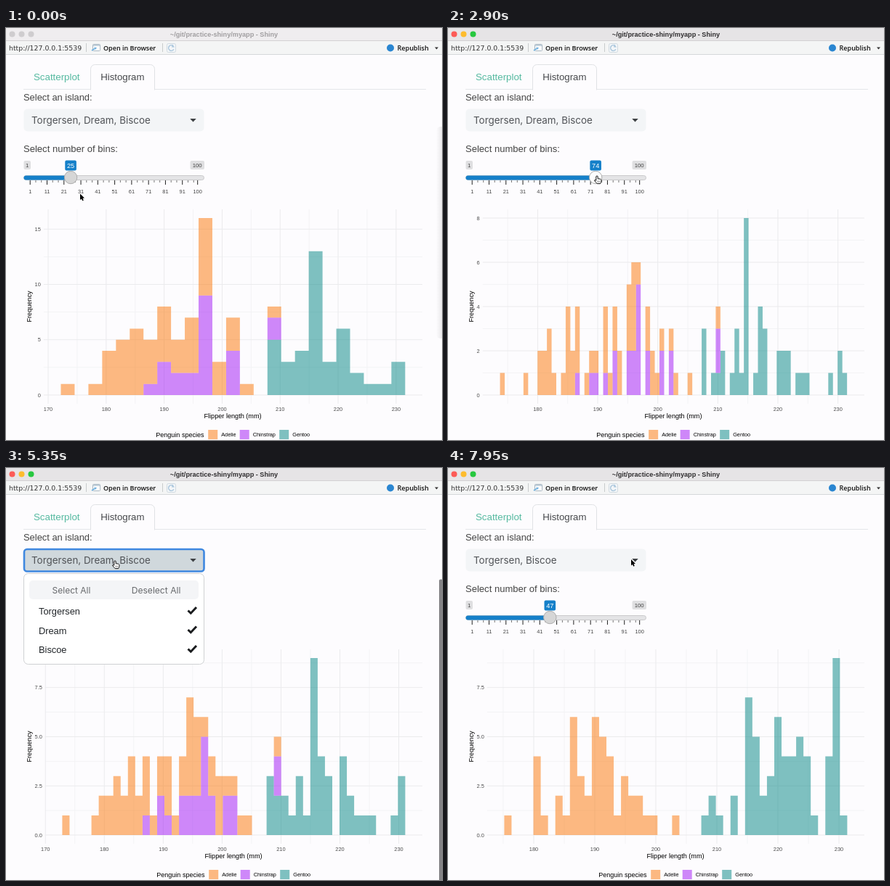
Write an HTML page with a canvas that moves like this. It is 600 by 568 pixels and loops after 8000 ms.

```html
<!DOCTYPE html>
<html lang="en">
<head>
<meta charset="utf-8">
<title>Histogram app</title>
<style>
  html, body { margin: 0; width: 100%; height: 100%; overflow: hidden; background: #fdfcfe; }
  canvas { display: block; width: 600px; height: 568px; }
</style>
</head>
<body>
<canvas id="stage" width="600" height="568"></canvas>
<script>
const ctx = document.getElementById('stage').getContext('2d');
const LOOP = 8000;
const SANS = '"Liberation Sans", Arial, sans-serif';
const ROUND = 'Inter, sans-serif';
const TOOL = '"Open Sans", sans-serif';
const BG = '#fdfcfe', BLUE = '#1580c9';

// Moments when something happens, in ms
const T = {
  activate: 450, grab: 600, release: 1500, plot74: 2300,
  regrab: 3050, rerelease: 4150, scrollbar: 4100, plot47: 4750,
  open: 5250, deselect: 6350, plotTwo: 6650, close: 7450, scrollbarGone: 7450
};

// Flipper length counts per mm, from a starting length; stacked bottom to top
const SPECIES = ['Adelie', 'Chinstrap', 'Gentoo'];
const COLORS = { Adelie: '#fb7706', Chinstrap: '#9f15f5', Gentoo: '#018583' };
const STACK = ['Gentoo', 'Chinstrap', 'Adelie'];
const threeIslands = {
  Adelie: [174, [1,0,0,0,1,0,2,2,3,1,1,4,2,3,1,1,1,3,1,2,2,3,4,1,2,2,1,1,1,1,0,1,0,0,0,0,1]],
  Chinstrap: [187, [1,0,1,1,1,0,2,0,2,2,5,2,0,0,2,2,0,0,0,0,0,0,0,2]],
  Gentoo: [208, [3,1,1,2,1,3,1,8,1,4,3,0,2,2,2,1,1,1,0,0,0,1,2,1]]
};
const twoIslands = {
  Adelie: [176, [1,0,0,0,2,2,1,0,2,1,6,0,3,2,6,5,4,0,1,3,2,2,1,0,1,0,0,1]],
  Chinstrap: [187, []],
  Gentoo: [208, [1,2,1,0,0,2,0,7,5,0,2,3,6,4,4,5,0,4,1,0,4,9,0,1]]
};

function makePlot(data, bins, left, step) {
  const min = data.Adelie[0], max = 231;
  const width = (max - min) / (bins - 1);
  const first = Math.round(min / width);
  const counts = {};
  for (const name of STACK) {
    counts[name] = Array(bins).fill(0);
    const [start, values] = data[name];
    values.forEach((n, i) => counts[name][Math.round((start + i) / width) - first] += n);
  }
  const totals = counts.Gentoo.map((n, i) => n + counts.Chinstrap[i] + counts.Adelie[i]);
  return { counts, bins, width, left, step, origin: (first - 0.5) * width, top: Math.max(...totals) };
}

const plots = [
  [0, makePlot(threeIslands, 25, 51.8, 5)],
  [T.plot74, makePlot(threeIslands, 74, 47.7, 2)],
  [T.plot47, makePlot(threeIslands, 47, 53.8, 2.5)],
  [T.plotTwo, makePlot(twoIslands, 47, 53.8, 2.5)]
];

const cursorPath = [
  [0, 102, 228.5], [450, 90, 205], [T.grab, 90, 204], [T.release, 205, 204], [T.regrab, 205, 204],
  [T.rerelease, 142, 204], [4250, 142, 203], [4450, 142, 195], [5100, 150, 128], [5350, 150, 128],
  [5950, 143.5, 216], [6100, 143.5, 216], [6300, 140, 221], [6450, 140, 221], [7050, 317.5, 186.5],
  [7150, 318, 186.5], [7400, 340, 200], [7550, 340, 200], [7900, 252, 126], [LOOP, 252, 126]
];
const valuePath = [[0, 25], [T.grab, 25], [T.release, 74], [T.regrab, 74], [T.rerelease, 47], [LOOP, 47]];

function follow(path, t) {
  const i = path.findIndex(key => key[0] > t);
  const [a, b] = [path[i - 1], path[i]];
  const u = (t - a[0]) / (b[0] - a[0]), ease = u * u * (3 - 2 * u);
  return a.slice(1).map((v, k) => v + (b[k + 1] - v) * ease);
}
const between = (t, from, to) => t >= from && t < to;

function text(str, x, y, size, color, family = SANS, align = 'left', weight = 400) {
  ctx.font = `${weight} ${size}px ${family}`;
  ctx.fillStyle = color;
  ctx.textAlign = align;
  ctx.fillText(str, x, y);
}
function rect(x, y, w, h, color) {
  ctx.fillStyle = color;
  ctx.fillRect(x, y, w, h);
}
function paint(fill, stroke, lineWidth = 1) {
  if (fill) { ctx.fillStyle = fill; ctx.fill(); }
  if (stroke) { ctx.strokeStyle = stroke; ctx.lineWidth = lineWidth; ctx.stroke(); }
}
function box(x, y, w, h, r, fill, stroke, lineWidth) {
  ctx.beginPath();
  ctx.roundRect(x, y, w, h, r);
  paint(fill, stroke, lineWidth);
}
function circle(x, y, r, fill, stroke) {
  ctx.beginPath();
  ctx.arc(x, y, r, 0, 7);
  paint(fill, stroke);
}
function shape(points, fill, stroke, lineWidth) {
  ctx.beginPath();
  points.forEach(([x, y]) => ctx.lineTo(x, y));
  ctx.closePath();
  paint(fill, stroke, lineWidth);
}
function line(points, color, width) {
  ctx.beginPath();
  points.forEach(([x, y]) => ctx.lineTo(x, y));
  paint(null, color, width);
}
const caret = (x, y, w, h, color) => shape([[x - w / 2, y], [x + w / 2, y], [x, y + h]], color);

function drawWindow(active) {
  rect(0, 0, 600, 17, active ? '#e6e4e6' : '#efedef');
  rect(0, 17, 600, 1, '#d3d1d3');
  rect(0, 18, 600, 18, '#f4f5f5');
  rect(0, 36, 600, 1, '#d5d8da');
  const lights = active ? ['#fc5b57', '#fdbc2e', '#28c840'] : Array(3).fill('#cfcdcf');
  lights.forEach((color, i) => circle(8.5 + 13 * i, 8.5, 4, color));
  text('~/git/practice-shiny/myapp - Shiny', 300, 11.5, 9.15, active ? '#2f2d2f' : '#a09ea0', SANS, 'center', 700);

  text('http://127.0.0.1:5539', 4, 30.5, 9.35, '#333', '"DejaVu Sans", sans-serif');
  rect(110, 21, 1, 12, '#c9cccd');
  rect(215, 21, 1, 12, '#c9cccd');
  box(119.5, 22.5, 10, 9, 1, '#fff', '#a9b7c2');
  rect(120, 23, 9, 2, '#c4d2dc');
  line([[118, 31], [122, 28.5]], '#6fafdd', 1.6);
  shape([[121, 26.5], [125, 27], [123, 30]], '#6fafdd');
  text('Open in Browser', 134, 30.5, 9, '#111', TOOL, 'left', 600);

  box(221.5, 21.5, 12, 12, 2, '#f3f6f8', '#d0dae1');
  ctx.beginPath();
  ctx.arc(227.5, 27.5, 3.8, 0.5, 5.4);
  paint(null, '#a9c6dc', 1.5);
  shape([[229, 22.5], [232, 26.5], [228, 26.5]], '#a9c6dc');

  circle(529, 27.5, 5, '#2a86d1');
  text('Republish', 538.5, 30.5, 9.05, '#111', TOOL, 'left', 600);
  caret(592.5, 26.5, 5, 3, '#333');
}

function drawTabs() {
  rect(24, 84, 554, 1, '#e4e6e9');
  ctx.beginPath();
  ctx.moveTo(116.5, 85.5);
  ctx.lineTo(116.5, 56.5);
  ctx.arcTo(116.5, 50.5, 122.5, 50.5, 6);
  ctx.arcTo(204.5, 50.5, 204.5, 56.5, 6);
  ctx.lineTo(204.5, 85.5);
  paint(BG, '#e0e2e5');
  text('Scatterplot', 38, 72, 13.3, '#55b9a0');
  text('Histogram', 130.3, 72, 13.2, '#45474a');
}

function drawSelect(t) {
  const open = between(t, T.open, T.close);
  text('Select an island:', 24, 100, 12.9, '#444');
  box(24.5, 111.5, 248, 31, 5, open ? '#d0d8dc' : '#f3f5f7');
  if (between(t, T.open, T.deselect)) box(25, 112, 247.5, 30.5, 4, null, '#3f88e0', 2.6);
  text(t < T.deselect ? 'Torgersen, Dream, Biscoe' : 'Torgersen, Biscoe', 35, 132, 13.4, '#505357', ROUND);
  caret(257.5, 125, 8.5, 4.5, '#3d4043');
}

function drawMenu(t) {
  box(24.5, 145.5, 248, 125, 6, '#fff', '#cfd1d3');
  box(32, 155, 233, 26, 5, '#f4f5f7');
  text('Select All', 90, 172.5, 12, '#67696c', ROUND, 'center');
  text('Deselect All', 206.5, 172.5, 12.1, '#67696c', ROUND, 'center');
  ['Torgersen', 'Dream', 'Biscoe'].forEach((name, i) => {
    const y = 202 + 26.5 * i;
    text(name, 45, y, 12.8, '#212529');
    if (name !== 'Dream' || t < T.deselect) {
      line([[250.5, y - 5.5], [254.3, y - 1.8], [262, y - 10]], '#1a1c1e', 3);
    }
  });
}

const sliderX = value => 33.2 + 2.328 * (value - 1);

function drawSlider(value, hot) {
  const x = sliderX(value);
  text('Select number of bins:', 24, 171, 13.05, '#444');
  box(24.5, 183, 9.5, 12, 2, '#dfdfe1');
  text('1', 29.2, 191.5, 7.8, '#444', SANS, 'center');
  box(253.5, 183, 19.5, 12, 2, '#dfdfe1');
  text('100', 263.2, 191.5, 7.8, '#444', SANS, 'center');

  for (let i = 0; i <= 30; i++) {
    const big = i % 3 === 0, mark = Math.min(100, 1 + i / 3 * 10), tick = sliderX(mark);
    rect(tick - 0.5, 210, 1, big ? 6 : 3, big ? '#222' : '#777');
    if (big) text(mark, tick, 228, 7.4, '#444', SANS, 'center');
  }
  box(24.5, 203.5, 248, 6, 3, '#e4e4e6', '#c9c9cb');
  box(24.5, 203.5, x - 24.5, 6, 3, BLUE);
  circle(x, 206, 8.7, hot ? '#fdfdfd' : '#d6d6d6', '#adadad');

  box(x - 7.8, 182.5, 15.6, 14, 2, BLUE);
  text(Math.round(value), x, 192.8, 9.2, '#fff', SANS, 'center');
}

function drawPlot(plot) {
  const { counts, bins, width, left, step, origin, top } = plot;
  const right = 573, pad = (right - left) / 22, binPx = 20 * pad / bins;
  const xOf = mm => left + pad + (mm - origin) / width * binPx;
  const yOf = n => 506 - 244 * n / top;

  const gridLines = major => {
    const color = major ? '#ebebed' : '#f3f3f5';
    for (let mm = major ? 170 : 165; mm <= 235; mm += 10) {
      const x = xOf(mm);
      if (x < left || x > right) continue;
      rect(x - 0.5, 250, 1, 268, color);
      if (major) text(mm, x, 527.6, 7.4, '#4d4d4d', SANS, 'center');
    }
    for (let n = major ? 0 : step / 2; yOf(n) > 250; n += step) {
      rect(left, yOf(n) - 0.5, right - left, 1, color);
      if (major) text(step % 1 ? n.toFixed(1) : n, left - 4, yOf(n) + 2.7, 7.4, '#4d4d4d', SANS, 'right');
    }
  };
  gridLines(false);
  gridLines(true);

  // One path per species keeps neighbouring bars free of seams
  ctx.globalAlpha = 0.5;
  const base = Array(bins).fill(0);
  for (const name of STACK) {
    ctx.beginPath();
    counts[name].forEach((n, i) => {
      if (n) ctx.rect(left + pad + i * binPx, yOf(base[i] + n), binPx, yOf(0) - yOf(n));
      base[i] += n;
    });
    paint(COLORS[name]);
  }
  ctx.globalAlpha = 1;

  text('Flipper length (mm)', (left + right) / 2 - 0.4, 538, 9.15, '#000', SANS, 'center');
  ctx.save();
  ctx.translate(35, 384);
  ctx.rotate(-Math.PI / 2);
  text('Frequency', 0, 0, 9.1, '#000', SANS, 'center');
  ctx.restore();

  const legend = left / 2 + 180.3;
  text('Penguin species', legend, 563.7, 9.05, '#000');
  SPECIES.forEach((name, i) => {
    const x = legend + [72, 115.5, 170][i];
    ctx.globalAlpha = 0.5;
    rect(x, 554, 13, 13, COLORS[name]);
    ctx.globalAlpha = 1;
    text(name, x + 18, 563.2, 7.3, '#000');
  });
}

const ARROW = [[0, 0], [0, 8.6], [1.9, 6.9], [3.3, 9.8], [4.8, 9.1], [3.5, 6.3], [6, 6.1]];
const HAND = new Path2D('M-1.2 .6Q0-.9 1.2.6V3.8Q5.6 3.4 6 5.6Q6 9 4.6 10.6H.2Q-2 8.6-3.6 6Q-3.4 4.6-1.2 6.2Z');

function drawCursor(x, y, hand) {
  ctx.save();
  ctx.translate(x, y);
  ctx.lineJoin = 'round';
  if (hand) {
    ctx.fillStyle = '#fff';
    ctx.fill(HAND);
    ctx.strokeStyle = '#111';
    ctx.lineWidth = 1;
    ctx.stroke(HAND);
    line([[1.2, 6.5], [1.2, 9]], '#333', 0.6);
    line([[3.2, 6.5], [3.2, 9]], '#333', 0.6);
  } else {
    shape(ARROW, '#000', '#fff', 1.4);
    shape(ARROW, '#000');
  }
  ctx.restore();
}

function draw(t) {
  const active = t >= T.activate;
  const onHandle = between(t, T.activate, 4300);
  const onMenu = between(t, 5000, 6600);
  rect(0, 0, 600, 568, BG);
  drawPlot(plots.filter(([start]) => t >= start).pop()[1]);
  drawTabs();
  drawSlider(follow(valuePath, t)[0], onHandle);
  drawSelect(t);
  if (between(t, T.open, T.close)) drawMenu(t);
  drawWindow(active);
  if (!active) {
    const shade = ctx.createLinearGradient(592, 0, 600, 0);
    shade.addColorStop(0, 'rgba(0,0,0,0)');
    shade.addColorStop(1, 'rgba(0,0,0,.08)');
    box(592, 136, 12, 292, 6, shade);
  }
  if (between(t, T.scrollbar, T.scrollbarGone)) box(596, 153.5, 5, 420, 2, '#858487');
  drawCursor(...follow(cursorPath, t), onHandle || onMenu);
}

function tick() {
  draw(performance.now() % LOOP);
  requestAnimationFrame(tick);
}
tick();
</script>
</body>
</html>
```
